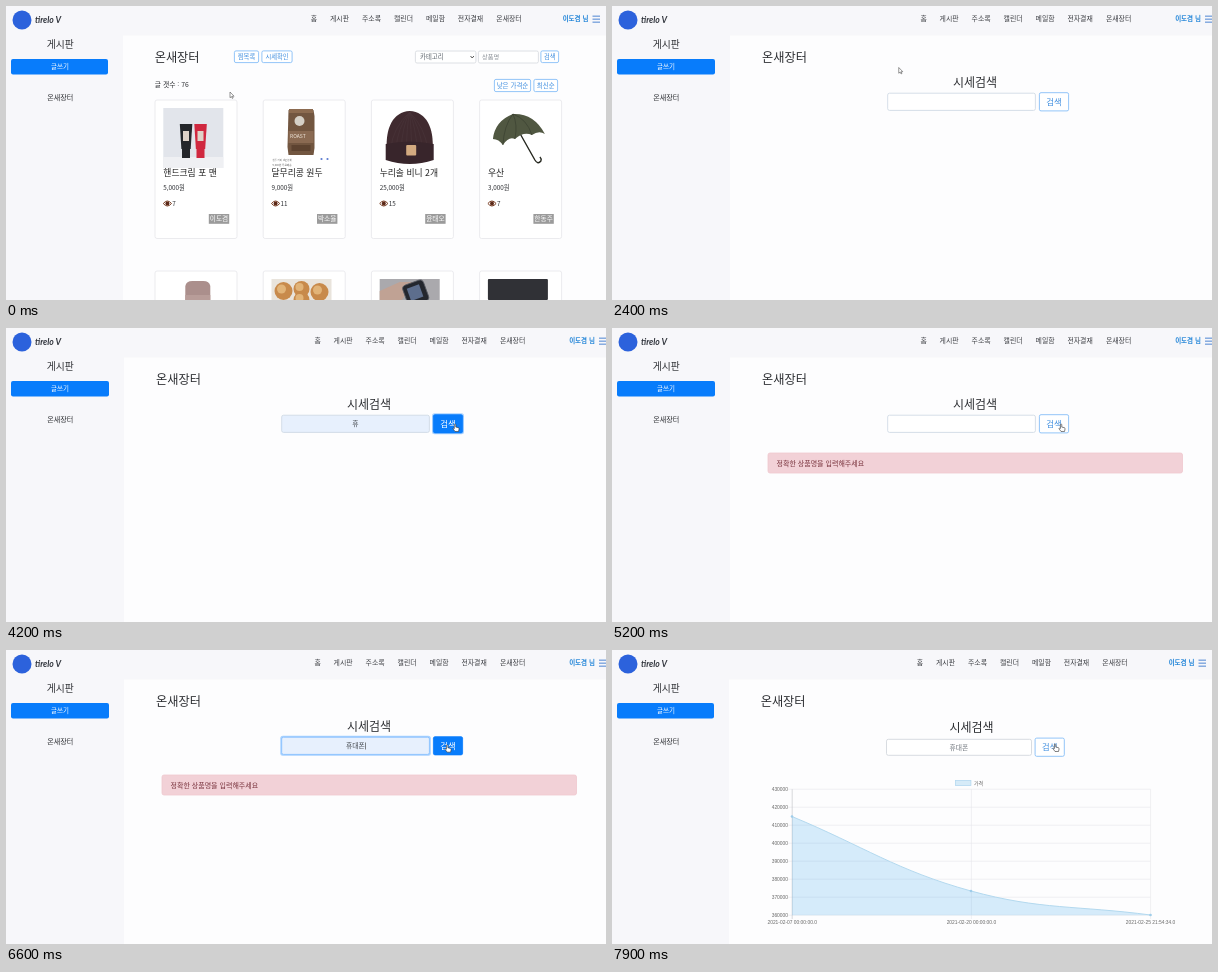
Animation of 600x294 px, one loop 8000 ms. Source, as an HTML page:

```html
<!DOCTYPE html>
<html lang="ko">
<head>
<meta charset="utf-8">
<title>시세검색</title>
<style>
html, body { margin: 0; width: 100%; height: 100%; overflow: hidden; background: #fdfdfe; }
svg { display: block; width: 600px; height: 294px; font-family: "Noto Sans CJK KR", "Noto Sans CJK JP", "Noto Sans", sans-serif; }
</style>
</head>
<body>
<svg viewBox="0 0 600 294"><g id="page"></g><g id="live"></g></svg>
<script>
const BLUE = '#087cfb', INK = '#2b2d31', MARKET = '온새장터', USER = '이도겸';

// Text is placed by its vertical centre.
const text = (x, cy, size, str, fill = INK, anchor = 'start', extra = '') =>
  `<text x="${x}" y="${cy + size * 0.36}" font-size="${size}" fill="${fill}" text-anchor="${anchor}" ${extra}>${str}</text>`;
const middle = (x, cy, size, str, fill, extra) => text(x, cy, size, str, fill, 'middle', extra);
const rect = (x, y, w, h, fill, stroke = 'none', r = 0) =>
  `<rect x="${x}" y="${y}" width="${w}" height="${h}" rx="${r}" fill="${fill}" stroke="${stroke}" stroke-width=".8"/>`;
const path = (d, fill = 'none', stroke = 'none', width = 1) =>
  `<path d="${d}" fill="${fill}" stroke="${stroke}" stroke-width="${width}" stroke-linejoin="round"/>`;
const circle = (x, y, r, fill) => `<circle cx="${x}" cy="${y}" r="${r}" fill="${fill}"/>`;
const ring = (x, y, w, h) => rect(x - 1, y - 1, w + 2, h + 2, '#a9d2ff', 'none', 2.5);

function button(x, y, w, h, size, label, active = false, focused = false) {
  return (focused ? ring(x, y, w, h) : '') +
    rect(x + .4, y + .4, w - .8, h - .8, active ? BLUE : '#fff', active ? BLUE : '#78b6f6', 1.6) +
    middle(x + w / 2, y + h / 2, size, label, active ? '#fff' : '#3f8edf');
}

// The wide layout has no scrollbar, so its parts sit further right.
function shell(wide) {
  const dx = wide ? 3.6 : 0, side = wide ? 118 : 117, ux = wide ? 6.5 : 0;
  const nav = [['홈', 308], ['게시판', 333.5], ['주소록', 365.5], ['캘린더', 397.5],
    ['메일함', 429.5], ['전자결재', 464.5], [MARKET, 503]];
  return rect(0, 0, 600, 294, '#fdfdfe') + rect(0, 0, 600, 29.5, '#f7f7fa') + rect(0, 0, side, 294, '#f7f7fa') +
    circle(16, 14, 9.5, '#2c62dc') +
    text(29, 13.5, 8.6, 'tirelo V', '#30343c', 'start', 'font-style="italic" font-weight="700" font-family="Lato, sans-serif"') +
    nav.map(([label, x]) => middle(x + dx, 13, 6.9, label, '#3b3d42', 'font-weight="500"')).join('') +
    middle(569.5 + ux, 13, 6.5, USER + ' 님', '#2285d8', 'font-weight="700"') +
    [10, 13, 16].map(y => rect(586.5 + ux, y - .4, 7.5, 1.1, '#5c8fd6')).join('') +
    middle(54.3, 38.5, 9.8, '게시판') +
    rect(5, 53, wide ? 98 : 97, 15.5, BLUE, 'none', 2) + middle(54, 60.7, 6.5, '글쓰기', '#fff') +
    middle(54.3, 91.5, 7.1, MARKET) +
    text(wide ? 150 : 148.7, 51.5, 12.2, MARKET);
}

const pictures = [
  x => rect(x, 102, 60, 60, '#e2e5eb') + rect(x, 151, 60, 11, '#eff0f3') +
    [[16.5, '#24262a'], [31, '#d0283f']].map(([dx, color]) =>
      path(`M${x + dx} 118h12.5l-1.6 25h-9.3z`, color) + rect(x + dx + 2.2, 143, 8, 9, color) +
      rect(x + dx + 3.2, 125, 6, 10, '#dfd2c8')).join(''),
  x => path(`M${x + 17} 104h25l1 6v32l-1 7h-25l-1-8z`, '#725640') + rect(x + 17.5, 103, 24, 4, '#8c6b50') +
    circle(x + 28, 115, 5, '#d5d0c7') + rect(x + 17, 125, 25, 12, '#8a6a52') +
    text(x + 18.5, 130, 5, 'ROAST', '#f1e8dc') + rect(x + 20, 139, 19, 6, '#5d4330') +
    rect(x, 152, 60, 10, '#fff') + text(x + 1, 154, 2.4, '원두 커피 1kg 분쇄', '#666') +
    circle(x + 50, 153, 1.1, '#5b7bd0') + circle(x + 56, 153, 1.1, '#5b7bd0') + text(x + 1, 159, 2.6, '9,000원 무료배송', '#555'),
  x => path(`M${x + 7} 143c-1-21 6-37 23-38 17 1 24 17 23 38z`, '#402a2f') +
    Array.from({ length: 8 }, (_, i) => path(`M${x + 11 + i * 5.3} 143Q${x + 13 + i * 4.6} 122 ${x + 30} 106`, 'none', '#4b363b', .6)).join('') +
    path(`M${x + 6} 138q24-5 48 0v16q-24 8-48 0z`, '#38252b') + rect(x + 26.5, 139, 10, 10.5, '#d3aa80', 'none', 1),
  x => path(`M${x + 29} 122L${x + 47} 154q3 5 6 1q1-2-1-4`, 'none', '#25271f', 1.4) +
    path(`M${x + 5} 133Q${x + 7} 115 ${x + 25} 108Q${x + 46} 107 ${x + 57} 128Q${x + 51} 124 ${x + 44} 129Q${x + 36} 125 ${x + 27} 133Q${x + 21} 130 ${x + 15} 139Q${x + 11} 133 ${x + 5} 133Z`, '#505741') +
    path(`M${x + 25} 108Q${x + 16} 120 ${x + 15} 139M${x + 25} 108Q${x + 30} 118 ${x + 27} 133M${x + 25} 108Q${x + 39} 113 ${x + 44} 129`, 'none', '#3d4333', .8)
];
const nextRow = [
  x => path(`M${x + 22} 294v-14q1-5 7-5h11q6 0 7 5v14z`, '#ab8f8c') + rect(x + 22, 289, 25, 5, '#b89d99'),
  x => rect(x, 273, 60, 21, '#e9e4dc') +
    [[12, 285, 9], [30, 283, 8], [48, 286, 9], [30, 294, 8]].map(([dx, y, r]) =>
      circle(x + dx, y, r, '#c88a4b') + circle(x + dx - 2, y - 2, r * .5, '#e2b478')).join(''),
  x => rect(x, 273, 60, 21, '#aaa9ad') + path(`M${x} 294v-9l20-9h16l-14 18z`, '#c0a294') +
    `<g transform="rotate(-20 ${x + 36} 287)">${rect(x + 25, 276, 22, 22, '#24272e', '#575b63', 4)}${rect(x + 29, 280, 13, 13, '#5d6e8d')}</g>`,
  x => rect(x, 273, 60, 21, '#303136', 'none', 1)
];
const goods = [
  ['핸드크림 포 맨', '5,000원', 7, USER], ['달무리콩 원두', '9,000원', 11, '박소율'],
  ['누리솔 비니 2개', '25,000원', 15, '윤태오'], ['우산', '3,000원', 7, '한동주']
];

function card([name, price, views, seller], i) {
  const x = 149 + i * 108.2, left = x + 8.3;
  return rect(x, 94, 82, 138.5, '#fff', '#e6e6ea', 2) + pictures[i](left) +
    text(left, 167, 8.8, name, '#222') + text(left, 181.5, 6.3, price) +
    path(`M${left} 197.5q4-5 8.2 0q-4.2 5-8.2 0z`, '#fff', '#7a3d22', 1) + circle(left + 4.1, 197.5, 2, '#5b2817') +
    text(left + 9, 197.5, 6.3, views) +
    rect(x + 53.8, 208, 20.4, 9.8, '#9b9b9b') + middle(x + 64, 213, 6.7, seller, '#fff') +
    rect(x, 265, 82, 60, '#fff', '#e6e6ea', 2) + nextRow[i](left);
}

const listPage = shell(false) + button(228, 44.5, 25, 12.5, 6.3, '찜목록') +
  rect(409.4, 45, 60.5, 12, '#fff', '#d5d9de', 1.6) + text(414, 51, 6.4, '카테고리', '#5c636b') +
  path('M464.5 50l1.7 2 1.7-2', 'none', '#444', .9) +
  rect(472.4, 45, 60, 12, '#fff', '#d5d9de', 1.6) + text(476, 51, 6.2, '상품명', '#858b92') +
  button(534.5, 44.5, 18.5, 12.5, 6.3, '검색') +
  text(148.8, 78.5, 6.8, '글 갯수 : 76') +
  button(488, 73, 37, 13, 6.5, '낮은 가격순') + button(527.5, 73, 24.5, 13, 6.5, '최신순') +
  goods.map(card).join('');

const searchPage = shell(true) + middle(363, 76.5, 12, '시세검색');
const alertBox = rect(156, 125, 414.5, 20, '#f2d1d7', '#efc8cf', 2) +
  text(164.5, 135, 7, '정확한 상품명을 입력해주세요', '#78323c');

function chartPage() {
  const label = (x, y, str, anchor) => text(x, y, 4.9, str, '#666', anchor, 'font-family="Liberation Sans, sans-serif"');
  const curve = 'M180 166.5C251.6 196.3 285 220.6 359 241C428 260 466.4 255.4 538.5 265';
  const dates = ['2021-02-07 00:00:00.0', '2021-02-20 00:00:00.0', '2021-02-25 21:54:34.0'];
  let out = shell(false) + middle(359.5, 77.5, 12, '시세검색') +
    rect(274.5, 89.3, 145, 16, '#fff', '#cfd4da', 1.8) + middle(347, 97.3, 6.8, '휴대폰', '#6f757c') +
    button(422.7, 87.7, 30, 19, 8.3, '검색') +
    rect(343.4, 130.4, 15.5, 5.2, '#d6ebf8', '#b4d9f0') + text(362, 132.8, 5, '가격', '#666');
  for (let i = 0; i < 8; i++) {
    const y = 139.2 + i * 18;
    out += path(`M176 ${y}H538.5`, 'none', '#e6e6e9', .6) + label(176, y, 430000 - i * 10000, 'end');
  }
  dates.forEach((date, i) => {
    const x = 180.2 + i * 179.2;
    out += path(`M${x} 139.2V269`, 'none', i ? '#e6e6e9' : '#bfc2c6', .6) + label(x, 272, date, 'middle');
  });
  return out + path(curve + 'V265.2H180Z', '#36a2eb33') + path(curve, 'none', '#b3d9ef', 1) +
    [[180, 166.5], [359, 241], [538.5, 265]].map(([x, y]) => circle(x, y, 1.3, '#9fcdea')).join('');
}
const resultPage = chartPage();

// Pointer stops: time, x, y
const stops = [[0, 224, 86], [100, 224, 86], [850, 280, 57.5], [2350, 280, 57.5], [2600, 345, 96], [2700, 345, 96],
  [2950, 325, 118], [3150, 325, 118], [3450, 340, 172], [3550, 340, 172], [3950, 449, 96], [5200, 449, 96],
  [5550, 370, 96], [5700, 370, 96], [6000, 388, 114], [6200, 388, 114], [6650, 443, 94], [8000, 443, 94]];
function pointerAt(t) {
  const i = stops.findIndex(s => s[0] > t);
  const [t0, x0, y0] = stops[i - 1], [t1, x1, y1] = stops[i];
  const u = (t - t0) / (t1 - t0), k = u * u * (3 - 2 * u);
  return [x0 + (x1 - x0) * k, y0 + (y1 - y0) * k];
}
const within = ([px, py], x, y, w, h) => px >= x && px <= x + w && py >= y && py <= y + h;

const shapes = {
  arrow: path('M0 0v6.5l1.6-1.3 1 2.1 1-.5-1-2h2z', '#fff', '#555', .7),
  hand: path('M-.7 .5q.8-1 1.6 0v3l3 .7q.9.4.7 1.5l-.6 2.8h-4l-2.3-3.2q0-1.1 1.6-.2z', '#fff', '#333', .7),
  beam: path('M-1 0h2M0 0v7M-1 7h2', 'none', '#444', .7)
};

// Search field states: start, value, caret x, suggested, filled, focused
const fields = [[2300, '', 0, 0, 0, 0], [2600, '', 350, 0, 0, 1], [2900, '휴대폰', 350, 1, 1, 1], [3250, '', 350, 0, 0, 1],
  [3400, '휴', 350, 1, 1, 1], [3500, '휴', 353, 0, 1, 1], [4100, '휴', 0, 0, 1, 0], [5000, '', 0, 0, 0, 0],
  [5700, '', 350, 0, 0, 1], [6000, '휴', 352.3, 0, 0, 1], [6200, '휴대폰', 352.3, 1, 1, 1],
  [6300, '휴대폰', 359.5, 0, 1, 1], [7500, '휴대폰', 0, 0, 1, 0]];

function searchForm(t, hover) {
  const [, value, caret, suggested, filled, focused] = fields.findLast(f => f[0] <= t);
  const clicked = (t >= 4100 && t < 5000) || t >= 7500;
  return (focused ? ring(275.3, 86.8, 148.5, 18) : '') +
    rect(275.7, 87.2, 147.7, 17.2, filled ? '#e7f0fd' : '#fff', focused ? '#80bdff' : '#ccd7e3', 1.8) +
    middle(349.5, 96, suggested ? 5.9 : 6.8, value, '#40454b') +
    (caret ? path(`M${caret} 92.5v7`, 'none', '#333', .6) : '') +
    button(427, 86.3, 30, 19, 8.4, '검색', hover || clicked, clicked) + (t >= 5000 ? alertBox : '');
}

const page = document.getElementById('page'), live = document.getElementById('live');
let shown, last;
function draw() {
  const t = Math.floor(performance.now() % 8000 / 100) * 100;
  if (t !== last) {
    last = t;
    const current = t < 2300 ? listPage : t < 7800 ? searchPage : resultPage;
    if (current !== shown) page.innerHTML = shown = current;
    const pointer = pointerAt(t);
    let over, out = '', shape = 'arrow';
    if (t < 2300) {
      over = within(pointer, 255.5, 44.5, 31, 13);
      out = button(255.5, 44.5, 31, 12.5, 6.3, '시세확인', over, over && t >= 1200);
    } else {
      over = within(pointer, 427, 86, 30, 19);
      if (t < 7800) out = searchForm(t, over && !(t >= 5000 && t < 5300));
      if (within(pointer, 275, 87, 149, 18)) shape = 'beam';
    }
    if (over) shape = 'hand';
    live.innerHTML = out + `<g transform="translate(${pointer}) scale(.88)">${shapes[shape]}</g>`;
  }
  requestAnimationFrame(draw);
}
draw();
</script>
</body>
</html>
```
